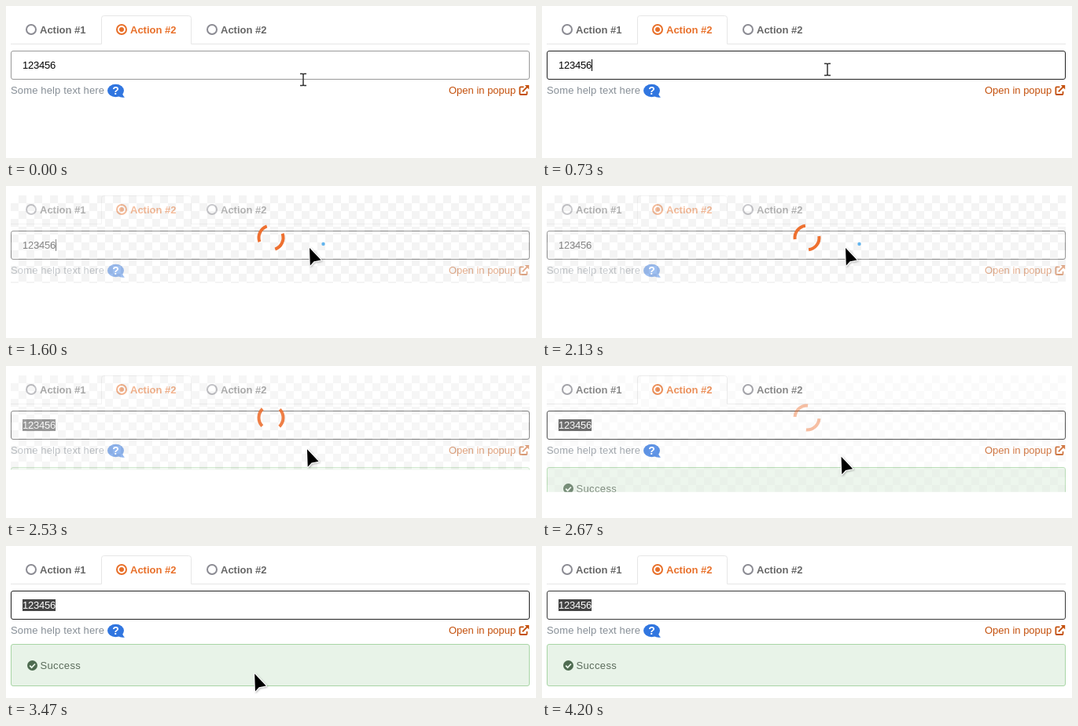
Recreate the animation shown at these times as an HTML page. Size 674 px wide and 194 px high, loop 4270 ms.

```html
<!DOCTYPE html>
<html lang="en">
<head>
<meta charset="utf-8">
<title>Form action with loading overlay</title>
<style>
html, body { margin: 0; width: 100%; height: 100%; overflow: hidden; background: #fff; }
svg { display: block; width: 674px; height: 194px; }
text { font: 13px "Liberation Sans", Arial, sans-serif; white-space: pre; }
.tab { font-weight: bold; fill: #666; }
.active { fill: #e8702a; }
.ring { fill: none; stroke: #8b8b93; stroke-width: 2; }
.ring.on { stroke: #e8702a; }
</style>
</head>
<body>
<svg viewBox="0 0 674 194">
  <defs>
    <pattern id="checker" x="6" y="12" width="20" height="20" patternUnits="userSpaceOnUse">
      <rect width="20" height="20" fill="#fff"/>
      <path d="M10 0h10v10h-10zM0 10h10v10h-10z" fill="#ebebeb"/>
    </pattern>
    <clipPath id="slide"><rect id="slideBox" x="0" y="125" width="674" height="54"/></clipPath>
    <filter id="shadow" x="-50%" y="-50%" width="200%" height="200%">
      <feDropShadow dx="1" dy="1" stdDeviation="1" flood-opacity=".3"/>
    </filter>
  </defs>

  <!-- tabs -->
  <path d="M6 48.5H121.5V15.5q0-3 3-3H232.5q3 0 3 3V48.5H666" fill="none" stroke="#e6e6e6"/>
  <circle class="ring" cx="32" cy="30" r="6"/>
  <text class="tab" x="43" y="35">Action #1</text>
  <circle class="ring on" cx="147" cy="30" r="6"/>
  <circle class="active" cx="147" cy="30" r="3"/>
  <text class="tab active" x="158" y="35">Action #2</text>
  <circle class="ring" cx="262" cy="30" r="6"/>
  <text class="tab" x="273" y="35">Action #2</text>

  <!-- input -->
  <rect id="field" x="6.5" y="57.5" width="659" height="36" rx="2.5" fill="#fff"/>
  <rect id="selection" x="21" y="68" width="42" height="15" fill="#444"/>
  <text id="value" x="21" y="80" letter-spacing="-.23">123456</text>
  <path id="caret" d="M63.5 68v15" stroke="#000"/>

  <!-- help and link -->
  <text x="6" y="112" letter-spacing=".15" fill="#868e96">Some help text here</text>
  <g fill="#3176e0">
    <ellipse cx="139.5" cy="108" rx="10.5" ry="8.2"/>
    <path d="M148 110q0 4 3 6.5q-5 1-9-2z"/>
  </g>
  <text x="139.5" y="113" text-anchor="middle" font-weight="bold" fill="#fff" style="font-weight:bold;font-size:14px">?</text>
  <text x="563" y="112" fill="#c4500c">Open in popup</text>
  <g fill="none" stroke="#c4500c" stroke-width="1.8">
    <path d="M658.5 103.4H654.4q-1 0-1 1V112q0 1 1 1H661.5q1 0 1-1V109"/>
    <path d="M656.8 109.3L663 103"/>
    <path d="M659.8 101H665.2V106.4z" fill="#c4500c" stroke="none"/>
  </g>

  <!-- alert -->
  <g id="alert" clip-path="url(#slide)">
    <g id="alertBody">
      <rect x="6.5" y="125.5" width="659" height="53" rx="2.5" fill="#e8f3e8" stroke="#a8d5a5"/>
      <circle cx="33.5" cy="152.5" r="6.5" fill="#4e6b50"/>
      <path d="M30.2 152.7l2.4 2.4 4.4-4.6" fill="none" stroke="#e8f3e8" stroke-width="1.8"/>
      <text x="43.5" y="157" letter-spacing=".35" fill="#5a6b5a">Success</text>
    </g>
  </g>

  <!-- loading overlay -->
  <rect id="overlay" x="6" y="12" width="660" height="112" fill="url(#checker)"/>
  <g id="spinner" fill="none" stroke="#ee7030" stroke-width="4">
    <path d="M10.96-10.96A15.5 15.5 0 0 1 10.96 10.96M-10.96 10.96A15.5 15.5 0 0 1-10.96-10.96"/>
  </g>

  <!-- pointers -->
  <g id="beam" fill="none">
    <path d="M-4-7.5H-1L0-6.5L1-7.5H4M0-7V7M-4 7.5H-1L0 6.5L1 7.5H4" stroke="#333" stroke-width="1.5"/>
  </g>
  <g id="arrow">
    <path d="M0 0L.8 22.5L5.6 17.2L14.6 15.6z" stroke="#fff" stroke-width="2" stroke-linejoin="round" paint-order="stroke" filter="url(#shadow)"/>
    <circle id="busy" cx="17.5" cy="-5" r="2.2" fill="#62b4ee"/>
  </g>
</svg>
<script>
const LOOP = 4270, FPS = 15, FRAMES = 64;
const $ = id => document.getElementById(id);
const set = (id, attrs) => {
  for (const k in attrs) $(id).setAttribute(k, attrs[k]);
};
const show = (id, on) => set(id, { visibility: on ? "visible" : "hidden" });
const ramp = (t, a, b) => Math.min(1, Math.max(0, (t - a) / (b - a)));
const swing = p => 0.5 - Math.cos(p * Math.PI) / 2;
const gray = v => `rgb(${[v, v, v].map(Math.round)})`;

// time, x, y of the pointer
const path = [
  [0, 378, 94], [470, 363, 81], [1260, 363, 81], [1600, 386, 79], [2300, 386, 79],
  [2530, 383, 106], [2670, 380.5, 116], [2867, 378.5, 128], [3333, 376, 143], [3467, 316, 163]
];

function pointer(t) {
  const i = path.findIndex(p => p[0] > t);
  if (i < 0) return path[path.length - 1].slice(1);
  const [a, b] = [path[i - 1], path[i]];
  const p = ramp(t, a[0], b[0]);
  return [1, 2].map(k => a[k] + (b[k] - a[k]) * p);
}

function draw(t) {
  const focus = ramp(t, 380, 530);
  const blur = ramp(t, 4080, 4700);
  set("field", { stroke: gray(153 - 119 * focus + 119 * blur) });

  const selected = t >= 2460;
  show("selection", selected);
  set("value", { fill: selected ? "#fff" : "#000" });
  show("caret", t >= 390 && !selected && Math.floor((t - 390) / 530) % 2 === 0);

  const settled = t >= 2850;
  const height = settled ? 54 : 54 * swing(ramp(t, 2480, 2815));
  const top = settled ? 125 : 129;
  show("alert", height > 0);
  set("slideBox", { y: top, height });
  set("alertBody", { transform: `translate(0 ${top - 125})` });

  const fade = ramp(t, 1230, 1560) * (1 - ramp(t, 2500, 2800));
  set("overlay", { opacity: fade * 0.53, height: height > 0 ? 117 + height : 112 });
  set("spinner", { opacity: fade, transform: `translate(337 66) rotate(${(t - 2530) * 0.36})` });

  const arrow = t >= 1300;
  const move = { transform: `translate(${pointer(t)})` };
  set("beam", move);
  set("arrow", move);
  show("beam", !arrow);
  show("arrow", arrow && t < 3500);
  show("busy", arrow && t < 2450);
}

function tick() {
  const t = performance.now() % LOOP;
  const frame = Math.min(FRAMES - 1, Math.floor((t + 5) * FPS / 1000));
  draw(frame * 1000 / FPS);
  requestAnimationFrame(tick);
}
tick();
</script>
</body>
</html>
```
